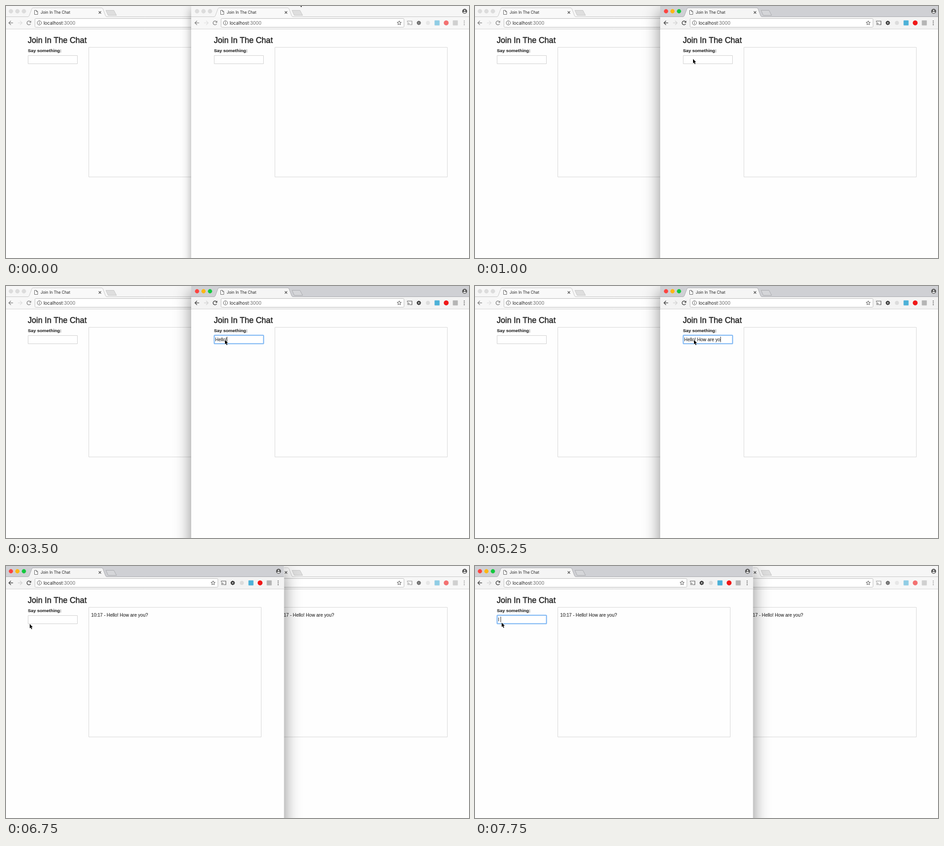
Recreate the animation shown at these times as an HTML page with a canvas. Size 1015x552 px, loop 8 s.

```html
<!DOCTYPE html>
<html lang="en">
<head>
<meta charset="utf-8">
<title>Join In The Chat</title>
<style>
  html, body { margin: 0; width: 100%; height: 100%; overflow: hidden; background: #fefefe; }
  canvas { display: block; }
</style>
</head>
<body>
<canvas id="stage" width="1015" height="552"></canvas>
<script>
const ctx = document.getElementById('stage').getContext('2d');
const LOOP = 8000, STEP = 250;
const ACTIVATE = 500, FOCUS = 1250, SEND = 6000, SWITCH = 6750, REPLY_FOCUS = 7250;
const UI = 'Inter, sans-serif', PAGE = '"Liberation Sans", Arial, sans-serif';
const INK = '#2b2b2b', ICON = '#444';
const TITLE = 'Join In The Chat';

// Typing comes in bursts: first step, last step, characters.
const question = [
  [1750, 2500, 'Hello'], [3500, 3500, '!'], [3750, 4000, ' Ho'],
  [4500, 5500, 'w are you'], [5750, 5750, '?']
];
const reply = [[7500, 7750, 'I ']];
// Pointer stops: time, x, y.
const stops = [
  [0, 643, -9], [1000, 478, 116], [FOCUS, 480, 118], [SEND, 480, 118],
  [6500, 67, 116], [SWITCH, 52, 127], [REPLY_FOCUS, 58.5, 124]
];

function typed(bursts, t) {
  return bursts.map(([start, end, chars]) => {
    const progress = (t - start + STEP) / (end - start + STEP);
    return chars.slice(0, Math.max(0, Math.ceil(progress * chars.length)));
  }).join('');
}

function pointerAt(t) {
  const next = stops.findIndex(stop => stop[0] > t);
  if (next < 0) return stops.at(-1).slice(1);
  const [t0, x0, y0] = stops[next - 1], [t1, x1, y1] = stops[next];
  const p = (t - t0) / (t1 - t0), ease = p * p * (3 - 2 * p);
  return [x0 + (x1 - x0) * ease, y0 + (y1 - y0) * ease];
}

function text(str, x, y, font, color = INK, weight = 0) {
  ctx.font = font;
  ctx.fillStyle = color;
  ctx.fillText(str, x, y);
  if (weight) {
    ctx.lineWidth = weight;
    ctx.strokeStyle = color;
    ctx.strokeText(str, x, y);
  }
  return ctx.measureText(str).width;
}

function paint(fill, stroke, width = 1) {
  ctx.lineWidth = width;
  if (fill) { ctx.fillStyle = fill; ctx.fill(); }
  if (stroke) { ctx.strokeStyle = stroke; ctx.stroke(); }
}

function poly(points, fill, stroke) {
  ctx.beginPath();
  points.forEach(([x, y]) => ctx.lineTo(x, y));
  ctx.closePath();
  paint(fill, stroke);
}

function circle(x, y, r, fill, stroke, width) {
  ctx.beginPath();
  ctx.arc(x, y, r, 0, 7);
  paint(fill, stroke, width);
}

function box(x, y, w, h, r, fill, stroke, width) {
  ctx.beginPath();
  ctx.roundRect(x, y, w, h, r);
  paint(fill, stroke, width);
}

function line(color, width, ...points) {
  ctx.beginPath();
  points.forEach(([x, y]) => ctx.lineTo(x, y));
  paint(null, color, width);
}

function arrow(x, dir, color) {
  const tip = x + 4.6 * dir;
  line(color, 1.4, [x - 4.6 * dir, 37], [tip, 37]);
  line(color, 1.4, [x, 32.4], [tip, 37], [x, 41.6]);
}

function reload(x, y) {
  ctx.beginPath();
  ctx.arc(x, y, 4.2, 0.5, 5.5);
  paint(null, ICON, 1.5);
  poly([[x + 5, y - 5], [x + 5, y - 0.6], [x + 0.6, y - 0.6]], ICON);
}

function star(x, y) {
  const points = Array.from({ length: 10 }, (_, i) => {
    const r = i % 2 ? 2.1 : 4.8, a = i * Math.PI / 5 - Math.PI / 2;
    return [x + r * Math.cos(a), y + r * Math.sin(a)];
  });
  poly(points, null, '#555');
}

function gear(x, y) {
  for (let i = 0; i < 4; i++) {
    const a = i * Math.PI / 4, dx = 4.8 * Math.cos(a), dy = 4.8 * Math.sin(a);
    line('#333', 2, [x - dx, y - dy], [x + dx, y + dy]);
  }
  circle(x, y, 2.6, '#f4f4f4', '#333', 2.2);
}

function cast(x, y) {
  line('#555', 1.2, [x - 5, y - 2], [x - 5, y - 4], [x + 5, y - 4], [x + 5, y + 4], [x + 1, y + 4]);
  for (const r of [1.2, 3, 5]) {
    ctx.beginPath();
    ctx.arc(x - 5, y + 4.5, r, -Math.PI / 2, 0);
    paint(null, '#555');
  }
}

function profile(x, y) {
  circle(x, y, 5.4, '#555');
  circle(x, y - 1.7, 1.6, '#eee');
  ctx.beginPath();
  ctx.ellipse(x, y + 2.5, 3.1, 1.5, 0, 0, 7);
  paint('#eee');
}

function tab(fill, edge) {
  ctx.beginPath();
  ctx.moveTo(47, 24);
  ctx.quadraticCurveTo(50, 23.5, 51, 21);
  ctx.lineTo(56.5, 6.5);
  ctx.quadraticCurveTo(57.3, 4, 60, 4);
  ctx.lineTo(209, 4);
  ctx.quadraticCurveTo(211.7, 4, 212.6, 6.5);
  ctx.lineTo(218, 21);
  ctx.quadraticCurveTo(219, 23.5, 222, 24);
  paint(fill, edge);

  poly([[62.5, 9.5], [67, 9.5], [69.5, 12], [69.5, 18.5], [62.5, 18.5]], '#fff', '#666');
  line('#666', 1, [66.5, 9.5], [66.5, 12.5], [69.5, 12.5]);
  text(TITLE, 76, 17.2, '8.4px ' + UI, '#222');
  for (const d of [-2.6, 2.6]) line('#555', 1.3, [205.8 - d, 11.5], [205.8 + d, 16.7]);
}

function titleBar(active) {
  const edge = active ? '#a9aaae' : '#c6c6c6';
  ctx.fillStyle = active ? '#cfd0d4' : '#f6f6f6';
  ctx.fillRect(-2, 0, 611.5, 24);
  line(edge, 1, [-2, 23.5], [609.5, 23.5]);
  tab(active ? '#f5f5f5' : '#f9f9f9', edge);
  poly([[219, 9.5], [236.5, 9.5], [242.3, 20.5], [224, 20.5]], active ? '#d5d6d9' : '#dedede', edge);
  ['#fc4440', '#fdb713', '#12c83e'].forEach((color, i) =>
    circle(10.8 + 14.2 * i, 11.5, 4.4, active ? color : '#dcdcdc', active ? color : '#d2d2d2', 0.5));
  profile(597.5, 11.5);
}

function toolbar(active) {
  ctx.fillStyle = active ? '#f3f3f3' : '#f7f7f7';
  ctx.fillRect(-2, 24, 611.5, 26);
  line('#d2d2d2', 1, [-2, 50.5], [609.5, 50.5]);

  box(63.5, 27.5, 401, 19, 2, '#fff', '#bbb');
  circle(73, 37, 4.6, null, '#555');
  line('#555', 1.2, [73, 36.2], [73, 39.6]);
  line('#555', 1.2, [73, 34], [73, 35.2]);
  const width = text('localhost', 82.2, 40.6, '9.9px ' + UI, '#222');
  text(':3000', 82.2 + width, 40.6, '9.9px ' + UI, '#6a6a6a');
  star(454, 37.3);

  ctx.globalAlpha = active ? 1 : 0.6;
  arrow(10.8, -1, ICON);
  arrow(30.7, 1, '#d2d2d2');
  reload(50.2, 37);
  cast(477, 37);
  gear(497, 37);
  circle(517, 37, 4.5, '#dcdcdc');
  box(531.5, 31.5, 11, 11, 1, '#4db1d8');
  circle(557, 37, 5.4, '#f01818');
  box(571.5, 31.5, 11, 11, 1, '#b5b5b5');
  for (const y of [33, 37, 41]) circle(596.6, y, 1.1, ICON);
  ctx.globalAlpha = 1;
}

function chatPage({ focused, draft, caret, sent }) {
  text(TITLE, 47.7, 80.8, '17.6px ' + PAGE, INK, 0.6);
  text('Say something:', 48, 100.6, 'bold 9.9px ' + PAGE, INK, 0.15);

  if (focused) box(48.5, 107.8, 108.2, 18.6, 1.5, '#fff', '#82b9f4', 2.3);
  else box(48.5, 108.5, 108, 18, 0, '#fff', '#cfcfcf');
  const width = text(draft, 50.4, 120.8, '10.05px ' + PAGE, INK, 0.15);
  const caretX = Math.round(50.5 + width) + 0.5;
  if (caret) line('#222', 1, [caretX, 111], [caretX, 123]);

  box(181.5, 90.5, 378, 284, 0, null, '#d6d6d6');
  if (sent) text('10:17 - Hello! How are you?', 186.8, 111.4, '10.05px ' + PAGE, INK, 0.15);
}

function browser(x, state) {
  ctx.save();
  ctx.translate(x, 0);
  ctx.shadowColor = `rgba(0,0,0,${state.active ? 0.46 : 0.36})`;
  ctx.shadowBlur = state.active ? 34 : 20;
  ctx.shadowOffsetY = state.active ? 12 : 6;
  ctx.fillStyle = '#fefefe';
  ctx.fillRect(-2, 0, 611.5, 640);
  ctx.shadowColor = 'transparent';
  ctx.beginPath();
  ctx.rect(-2, 0, 611.5, 552);
  ctx.clip();
  titleBar(state.active);
  toolbar(state.active);
  chatPage(state);
  ctx.restore();
}

function pointer(x, y) {
  ctx.save();
  ctx.translate(x, y);
  const shape = [[0, 0], [0, 9.6], [2.1, 7.7], [3.8, 11.4], [5.4, 10.7], [3.7, 7.1], [6.6, 6.9]];
  poly(shape, null, '#fff');
  poly(shape, '#000');
  ctx.restore();
}

function draw(t) {
  const leftFront = t >= SWITCH, sent = t >= SEND, replying = t >= REPLY_FOCUS;
  const blink = t >= 3000 && t < 3500;
  const left = { active: leftFront, focused: replying, draft: typed(reply, t), caret: replying, sent };
  const right = {
    active: t >= ACTIVATE && !leftFront,
    focused: t >= FOCUS && !leftFront,
    draft: sent ? '' : typed(question, t),
    caret: t >= FOCUS && !sent && !blink,
    sent
  };
  const windows = [[0, left], [408, right]];
  if (leftFront) windows.reverse();

  ctx.clearRect(0, 0, 1015, 552);
  for (const [x, state] of windows) browser(x, state);
  pointer(...pointerAt(t));
}

function tick() {
  draw(Math.floor(performance.now() % LOOP / STEP) * STEP);
  requestAnimationFrame(tick);
}
ctx.lineJoin = 'round';
tick();
</script>
</body>
</html>
```
